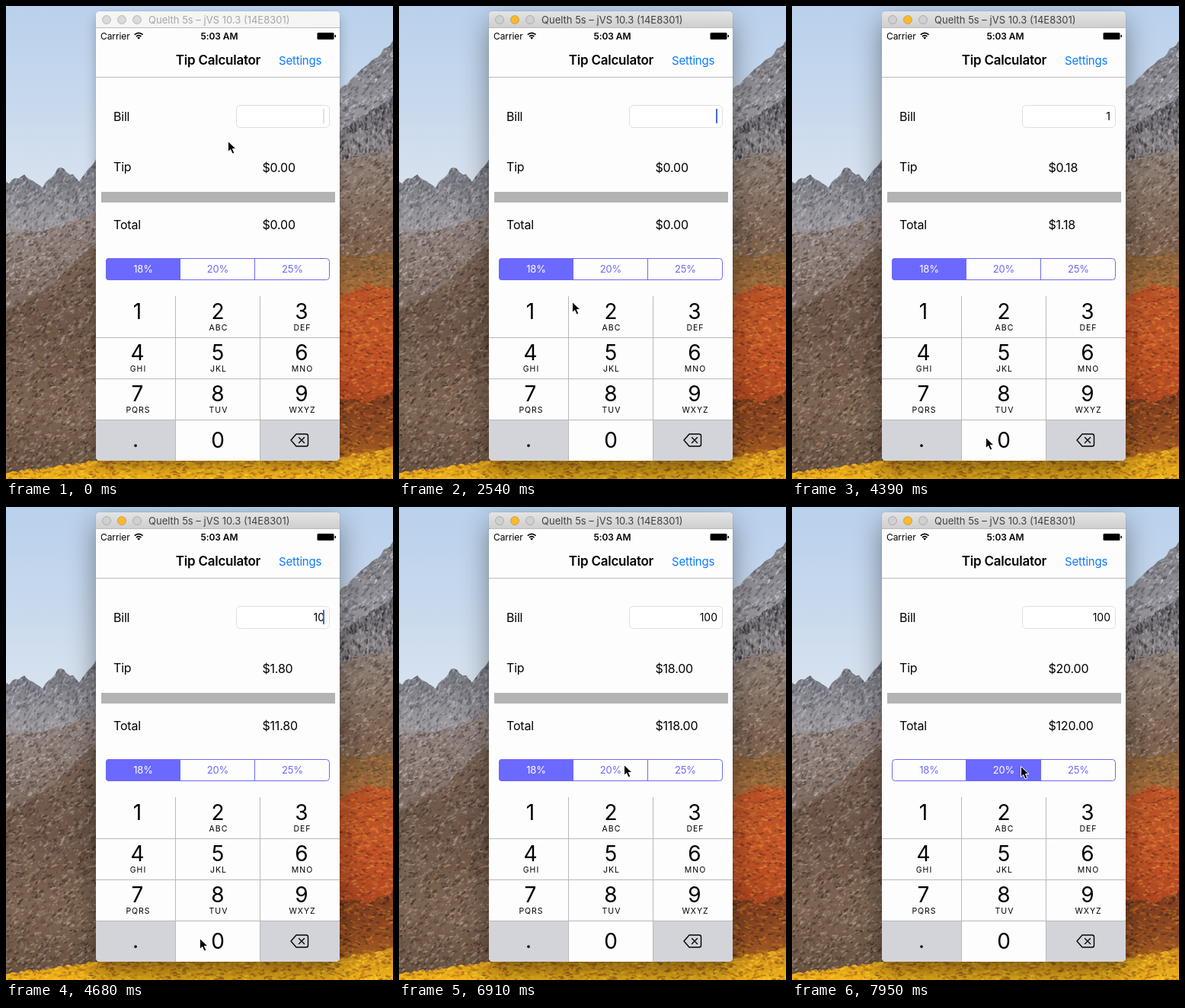
Write an HTML page with a canvas that moves like this. It is 508 px wide and 621 px high and loops after 8000 ms.

```html
<!DOCTYPE html>
<html lang="en">
<head>
<meta charset="utf-8">
<title>Tip Calculator</title>
<style>
html, body { margin: 0; width: 100%; height: 100%; overflow: hidden; }
canvas, svg { position: absolute; left: 0; top: 0; }
#shadow { position: absolute; left: 118px; top: 7px; width: 320px; height: 590px; border-radius: 5px; box-shadow: 0 8px 16px rgba(0,0,0,.26), 0 0 1px rgba(0,0,0,.4); }
#shadow.focused { box-shadow: 0 14px 36px rgba(0,0,0,.42), 0 0 1px rgba(0,0,0,.5); }
svg { font-family: Inter, Roboto, sans-serif; }
.label { font-size: 16px; letter-spacing: -.2px; }
.mid { text-anchor: middle; }
.digit { font-size: 28px; }
.letters { font-size: 10.5px; letter-spacing: 1px; }
.segment { font-size: 13px; letter-spacing: -.2px; }
</style>
</head>
<body>
<canvas id="photo" width="508" height="621"></canvas>
<div id="shadow"></div>
<svg width="508" height="621" viewBox="0 0 508 621">
  <defs>
    <linearGradient id="bar" x2="0" y2="1"><stop stop-color="#e4e4e4"/><stop offset="1" stop-color="#cfcfcf"/></linearGradient>
    <clipPath id="frame"><rect x="118" y="7" width="320" height="590" rx="5"/></clipPath>
  </defs>
  <g clip-path="url(#frame)">
    <path fill="#fdfdfd" d="M118 7h320v590H118z"/>
    <rect id="titlebar" x="118" y="7" width="320" height="21"/>
    <path stroke="#bbb" d="M118 28.5h320"/>
    <g id="lights" stroke-opacity=".2" stroke="#000">
      <circle cx="132" cy="18" r="5.5"/><circle cx="152" cy="18" r="5.5"/><circle cx="172" cy="18" r="5.5"/>
    </g>
    <text id="caption" x="187" y="23" font-size="13">Quelth 5s – jVS 10.3 (14E8301)</text>

    <text x="124" y="43.5" font-size="12" letter-spacing="-.1">Carrier</text>
    <path fill="none" stroke="#000" stroke-width="1.7" d="M168.8 37.6q5.4-4.6 10.8 0M171 40q3.2-2.7 6.4 0"/>
    <path d="M172.2 41.4q2-1.5 4 0l-2 2.4z"/>
    <text class="mid" x="280" y="43.5" font-size="12" font-weight="600" letter-spacing="-.1">5:03 AM</text>
    <rect x="408.5" y="35" width="22" height="9" rx="1.5" stroke="#888" stroke-width=".5"/>
    <path d="M431.5 38h1.5v3h-1.5z"/>
    <text class="mid" x="278.5" y="77" font-size="17" font-weight="600" letter-spacing="-.25">Tip Calculator</text>
    <text x="358" y="77" font-size="15" letter-spacing="-.2" fill="#0a7bff">Settings</text>
    <path stroke="#bcbcbc" d="M118 93.5h320"/>

    <g class="label">
      <text x="141" y="151">Bill</text><text x="141" y="217">Tip</text><text x="141" y="293">Total</text>
      <text id="tip" x="336.5" y="217.5"></text><text id="total" x="336.5" y="293"></text>
    </g>
    <rect x="302.5" y="130.5" width="122" height="29" rx="5" fill="#fff" stroke="#dedede"/>
    <text id="bill" x="418" y="150" font-size="14" text-anchor="end"></text>
    <path id="caret" fill="#426bd8" d="M416 135h2v19h-2z"/>
    <path fill="#b3b3b3" d="M125 244h307v14H125z"/>
    <g id="segments"></g>
    <rect x="131.5" y="331.5" width="293" height="28" rx="4" fill="none" stroke="#6b69f8"/>
    <path stroke="#6b69f8" d="M228.5 331v29M326.5 331v29"/>

    <path fill="#d2d4d9" d="M118 543h104v54H118zM333 543h105v54H333z"/>
    <path id="pressed" fill="#d2d4d9"/>
    <path stroke="#b9b9bc" d="M222.5 381v216M333.5 381v216M118 435.5h320M118 489.5h320M118 543.5h320"/>
    <g id="keys"></g>
    <path fill="none" stroke="#000" stroke-width="1.4" stroke-linejoin="round" stroke-linecap="round" d="M381 562h13q2.500 0 2.500 2.500v11q0 2.500-2.500 2.500h-13l-7-8zM384.500 566.500l7 7M391.500 566.500l-7 7"/>
  </g>
  <path id="mouse" stroke="#fff" stroke-linejoin="round" d="M.5 .5V14.500l3.200-3 2.400 5.500 2.700-1.200-2.400-5.300H11z"/>
</svg>
<script>
const $ = id => document.getElementById(id);
const clamp = v => Math.min(1, Math.max(0, v));

// Background photograph: layered hills with seeded grain
const c = $('photo').getContext('2d');
let seed = 7;
const random = () => (seed = seed * 16807 % 2147483647) / 2147483647;

function gradient(y0, y1, colors) {
  const g = c.createLinearGradient(0, y0, 0, y1);
  colors.forEach((color, i) => g.addColorStop(i / (colors.length - 1), color));
  return g;
}

// ridge: heights evenly spaced from x to x + w
function hill(x, w, ridge, bottom, colors, specks, tilt = -.6) {
  const top = Math.min(...ridge), steps = ridge.length - 1;
  c.save();
  c.beginPath();
  c.moveTo(x, bottom);
  for (let i = 0; i <= w; i += 4) {
    const p = i / w * steps, k = Math.min(Math.floor(p), steps - 1);
    c.lineTo(x + i, ridge[k] + (ridge[k + 1] - ridge[k]) * (p - k) + random() * 5 - 2.5);
  }
  c.lineTo(x + w, bottom);
  c.clip();
  c.fillStyle = gradient(top, bottom, colors);
  c.fillRect(x, top - 5, w, bottom - top + 5);
  for (let i = 0; i < w * (bottom - top) / 12; i++) {
    c.fillStyle = specks[i % specks.length];
    c.globalAlpha = .15 + random() * .5;
    c.beginPath();
    c.ellipse(x + random() * w, top + random() * (bottom - top), 1 + random() * 3, 1.2, tilt + random() - .5, 0, 7);
    c.fill();
  }
  c.restore();
}

c.fillStyle = gradient(0, 240, ['#b9d1ec', '#c6d8ed', '#d8e2ef']);
c.fillRect(0, 0, 508, 621);

hill(0, 120, [233, 222, 237, 211, 229, 198], 330, ['#6f727a', '#85858c', '#a09ca0', '#85746d'], ['#50515b', '#b9bac5', '#6a6870'], 2.2);
hill(0, 120, [300, 294, 270], 420, ['#958986', '#8a7b74', '#7a665a'], ['#4c3f3b', '#bdb3b1', '#6c584e']);
hill(0, 120, [400, 365, 310], 520, ['#7b6558', '#6f5849', '#7d6655'], ['#3d2e28', '#a8978b', '#6a5143']);
hill(0, 120, [505, 470, 430], 621, ['#6b5344', '#7d6654', '#66503f'], ['#3a2c25', '#b09c8c', '#75543f']);

hill(436, 72, [113, 80, 46], 200, ['#7e7e84', '#96939a', '#a39fa3'], ['#4f5057', '#d0d1da', '#77767c'], 2.4);
hill(436, 72, [165, 142, 118], 240, ['#66646a', '#8b868a', '#8f8580'], ['#28282b', '#35343a', '#b5b1b6'], 1.6);
hill(436, 72, [205, 195, 190], 360, ['#8b817e', '#8a7668', '#7d6250', '#8a6847'], ['#4c3d34', '#b7a598', '#75604f']);
hill(436, 72, [325, 330, 322], 420, ['#80603f', '#a56d3b', '#b05c2c'], ['#4f452a', '#c48a48', '#8b5030'], 0);
hill(436, 72, [385, 365, 372], 540, ['#b8562a', '#bf5326', '#a5431f'], ['#dc7131', '#6b2d1b', '#c84820', '#e08a3c'], 0);
hill(436, 72, [515, 520, 505], 621, ['#7d3a20', '#8d4b22', '#b87020'], ['#45261a', '#b5541f', '#cb8428'], 0);
hill(0, 508, [612, 606, 594, 591, 591, 591, 591, 591, 580], 621, ['#c5831e', '#dc9e1b', '#efb318'], ['#ffd633', '#a85a1c', '#f9c01b', '#83501a'], 0);

// Keypad and segmented control
const letters = ['', 'ABC', 'DEF', 'GHI', 'JKL', 'MNO', 'PQRS', 'TUV', 'WXYZ'];
const columns = [172.5, 278, 388];
$('keys').innerHTML = letters.map((s, i) => {
  const x = columns[i % 3], y = 411 + 54 * Math.floor(i / 3);
  return `<text class="digit mid" x="${x}" y="${y}">${i + 1}</text><text class="letters mid" x="${x + 1}" y="${y + 15}">${s}</text>`;
}).join('') + '<text class="digit mid" x="278" y="580">0</text><text class="digit mid" x="170" y="579">.</text>';

const rates = [18, 20, 25];
$('segments').innerHTML = rates.map((r, i) =>
  `<rect x="${131 + 98 * i}" y="331" width="98" height="29" rx="${i === 1 ? 0 : 4}"/><text class="segment mid" x="${180 + 98 * i}" y="350">${r}%</text>`).join('');
const segments = [...$('segments').querySelectorAll('rect')];
const segmentLabels = [...$('segments').querySelectorAll('text')];

// Timeline
const SAMPLE = 146.5, TAP = 150;
const focusTime = 750, rateTap = 7210;
const moves = [ // end, duration, x, y
  [750, 600, 369, 140], [2490, 200, 227, 388], [2840, 300, 174, 407],
  [4240, 350, 254, 566], [6400, 300, 295, 338], [7900, 150, 300, 340]];
const taps = [{ time: 3290, key: '1' }, { time: 4530, key: '0' }, { time: 5130, key: '0' }];
const keyShapes = { 1: 'M118 381h104v54H118z', 0: 'M223 543h110v54H223z' };

function mouseAt(t) {
  let x = 291, y = 177;
  for (const [end, duration, toX, toY] of moves) {
    const p = clamp((t - end + duration) / duration), eased = p * p * (3 - 2 * p);
    x += (toX - x) * eased;
    y += (toY - y) * eased;
  }
  return [Math.round(x), Math.round(y)];
}

// The caret blinks every 960 ms and starts solid after each touch
function caretAt(t) {
  const resets = [-570, focusTime, 1100, ...taps.map(tap => tap.time + TAP)];
  const phase = (t - resets.filter(r => r <= t).pop()) % 960;
  return clamp(Math.max((600 - phase) / 150, (phase - 810) / 150));
}

const money = n => '$' + n.toFixed(2);

function draw() {
  const t = performance.now() % 8000;
  const sampled = Math.floor(t / SAMPLE) * SAMPLE;
  const focused = t >= focusTime;
  $('shadow').className = focused ? 'focused' : '';
  $('titlebar').setAttribute('fill', focused ? 'url(#bar)' : '#f5f5f5');
  $('caption').setAttribute('fill', focused ? '#404040' : '#a6a6a6');
  [...$('lights').children].forEach((light, i) =>
    light.setAttribute('fill', !focused ? '#dadada' : i === 1 ? '#fdb92c' : '#d0d0d0'));

  $('mouse').setAttribute('transform', `translate(${mouseAt(sampled)})`);
  $('caret').style.opacity = caretAt(sampled);

  const held = taps.find(tap => t >= tap.time && t < tap.time + TAP);
  $('pressed').setAttribute('d', held ? keyShapes[held.key] : '');

  const selected = t >= rateTap + TAP ? 1 : 0;
  segments.forEach((s, i) => s.setAttribute('fill', i === selected ? '#6b69ff' : i === 1 && t >= rateTap ? '#dedeff' : '#fdfdfd'));
  segmentLabels.forEach((s, i) => s.setAttribute('fill', i === selected ? '#fff' : '#6b69f8'));

  const amount = taps.filter(tap => t >= tap.time + TAP).map(tap => tap.key).join('');
  const tip = amount * rates[selected] / 100;
  $('bill').textContent = amount;
  $('tip').textContent = money(tip);
  $('total').textContent = money(+amount + tip);
  requestAnimationFrame(draw);
}
draw();
</script>
</body>
</html>
```
